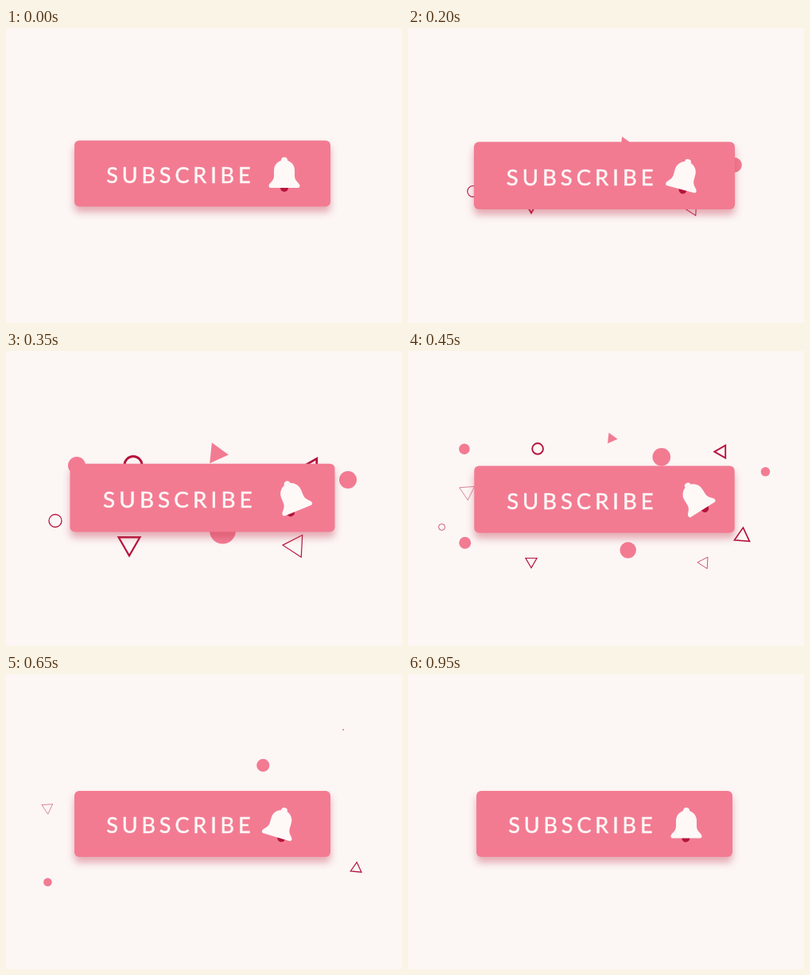
An HTML page with a canvas that plays this animation: 498 by 371 pixels, repeating every 1400 ms.

```html
<!DOCTYPE html>
<html lang="en">
<head>
<meta charset="utf-8">
<title>Subscribe button</title>
<style>
html, body { margin: 0; width: 100%; height: 100%; overflow: hidden; background: #fcf6f5; }
canvas { display: block; }
</style>
</head>
<body>
<canvas id="stage" width="498" height="371"></canvas>
<script>
const ctx = document.getElementById('stage').getContext('2d');
const LOOP = 1400, STEP = 50;
const PAPER = '#fcf6f5', PINK = '#f27b92', RED = '#b5143c', WHITE = '#fef8f7';
const rad = deg => deg * Math.PI / 180;
const clamp = v => Math.max(0, Math.min(1, v));

// Cosine easing from key to key, keys are [time, value]
function ease(t, keys) {
  return keys.reduce(([t0, v0], [t1, v1]) => {
    const k = clamp((t - t0) / (t1 - t0));
    return [t1, v0 + (v1 - v0) * (1 - Math.cos(Math.PI * k)) / 2];
  })[1];
}

// Each burst: time of full size and, in 200 ms units, how long before it the growth begins.
// Each piece: position then, distance flown and relative size left 200 ms later,
// w line width (none = filled), tri direction of a triangle's tip.
const bursts = [
  { at: 350, lead: 1.5, pieces: [
    { x: 430, y: 162, dx: 44, dy: -23, r: 11 },
    { x: 62, y: 213.5, dx: -44, dy: 18, r: 8, end: 0, w: 1.3 },
    { x: 265, y: 129, dx: -21, dy: -43, r: 15, tri: 6 },
    { x: 155, y: 242, dx: 0, dy: 51, r: 15.5, w: 2.3, tri: 90 },
    { x: 364, y: 245, dx: 19, dy: 48, r: 16, w: 1.2, tri: 63 },
    { x: 272.5, y: 226, dx: 9.5, dy: 55.5, r: 16.5, end: .24 },
    { x: 89, y: 144, dx: -41, dy: -47, r: 11, end: .23 },
    { x: 160, y: 143.5, dx: 7, dy: -46.5, r: 11, end: .25, w: 3 },
    { x: 384, y: 147, dx: 24, dy: -46, r: 13.5, end: .36, w: 2.8, tri: 180 }
  ] },
  { at: 550, lead: 1, pieces: [
    { x: 320.7, y: 125.5, dx: 5.8, dy: -24, r: 11.3, end: .43 },
    { x: 65, y: 173, dx: -29, dy: -11, r: 11, end: .45, w: .5, tri: 86 },
    { x: 63.5, y: 250, dx: -25, dy: 26.5, r: 7.5, end: .41 },
    { x: 429, y: 238, dx: 26, dy: 15, r: 11, end: .44, w: 1.7, tri: -85 }
  ] }
];

function drawPiece({ x, y, dx, dy, r, end = .05, w, tri }, s, lead) {
  const grown = Math.sqrt(clamp((s + lead) / (lead - .5)));
  const size = Math.min(grown, 1 - (1 - end) * s);
  if (size <= 0) return;
  const u = s * (.77 + .23 * s);
  ctx.save();
  ctx.translate(x + dx * u, y + dy * u);
  ctx.beginPath();
  if (tri === undefined) ctx.arc(0, 0, r * size, 0, 7);
  else for (let i = 0; i < 3; i++) {
    const a = rad(tri + 120 * i);
    ctx.lineTo(r * size * Math.cos(a), r * size * Math.sin(a));
  }
  ctx.closePath();
  ctx.fillStyle = PINK;
  ctx.strokeStyle = RED;
  ctx.lineWidth = Math.max(w * size, Math.min(w, .7));
  w ? ctx.stroke() : ctx.fill();
  ctx.restore();
}

const bell = new Path2D('M-13 13a13 13 0 0 1 26 0V20C13 27 19.5 29 19.5 32.5a2.5 2.5 0 0 1-2.5 2.5h-34' +
  'a2.5 2.5 0 0 1-2.5-2.5C-19.5 29-13 27-13 20z');
bell.arc(0, .5, 4, 0, 7);
const clapper = new Path2D();
clapper.arc(0, 35, 5, 0, 7);

const swing = t => ease(t, [[100, 0], [250, 20], [390, -32], [500, -32], [700, 25], [950, 0]]);

function drawHanging(path, color, angle) {
  ctx.save();
  ctx.translate(103, -17);
  ctx.rotate(rad(angle));
  ctx.fillStyle = color;
  ctx.fill(path);
  ctx.restore();
}

function drawButton(t) {
  const y = ease(t, [[0, 183], [100, 188.5], [250, 184.7], [350, 184.7], [550, 188.5]]);
  const scale = ease(t, [[0, 1], [100, .975], [250, 1.034], [350, 1.034], [550, 1]]);
  ctx.save();
  ctx.translate(247, y);
  ctx.scale(scale, scale);

  ctx.save();
  ctx.shadowColor = 'rgba(195, 65, 85, .42)';
  ctx.shadowOffsetY = 7;
  ctx.shadowBlur = 10;
  ctx.fillStyle = PINK;
  ctx.beginPath();
  ctx.roundRect(-161, -41.5, 322, 83, 6);
  ctx.fill();
  ctx.restore();

  ctx.font = '27px Lato, sans-serif';
  ctx.letterSpacing = '4.9px';
  ctx.fillStyle = ctx.strokeStyle = WHITE;
  ctx.lineWidth = .5;
  ctx.fillText('SUBSCRIBE', -120.8, 11.8);
  ctx.strokeText('SUBSCRIBE', -120.8, 11.8);

  // The clapper lags behind the bell and swings wider
  drawHanging(clapper, RED, 1.15 * swing(t - 30));
  drawHanging(bell, WHITE, swing(t));
  ctx.restore();
}

function frame(now) {
  const t = Math.floor(now % LOOP / STEP) * STEP;
  ctx.fillStyle = PAPER;
  ctx.fillRect(0, 0, 498, 371);
  for (const { at, lead, pieces } of bursts)
    for (const p of pieces) drawPiece(p, (t - at) / 200, lead);
  drawButton(t);
  requestAnimationFrame(frame);
}
requestAnimationFrame(frame);
</script>
</body>
</html>
```
